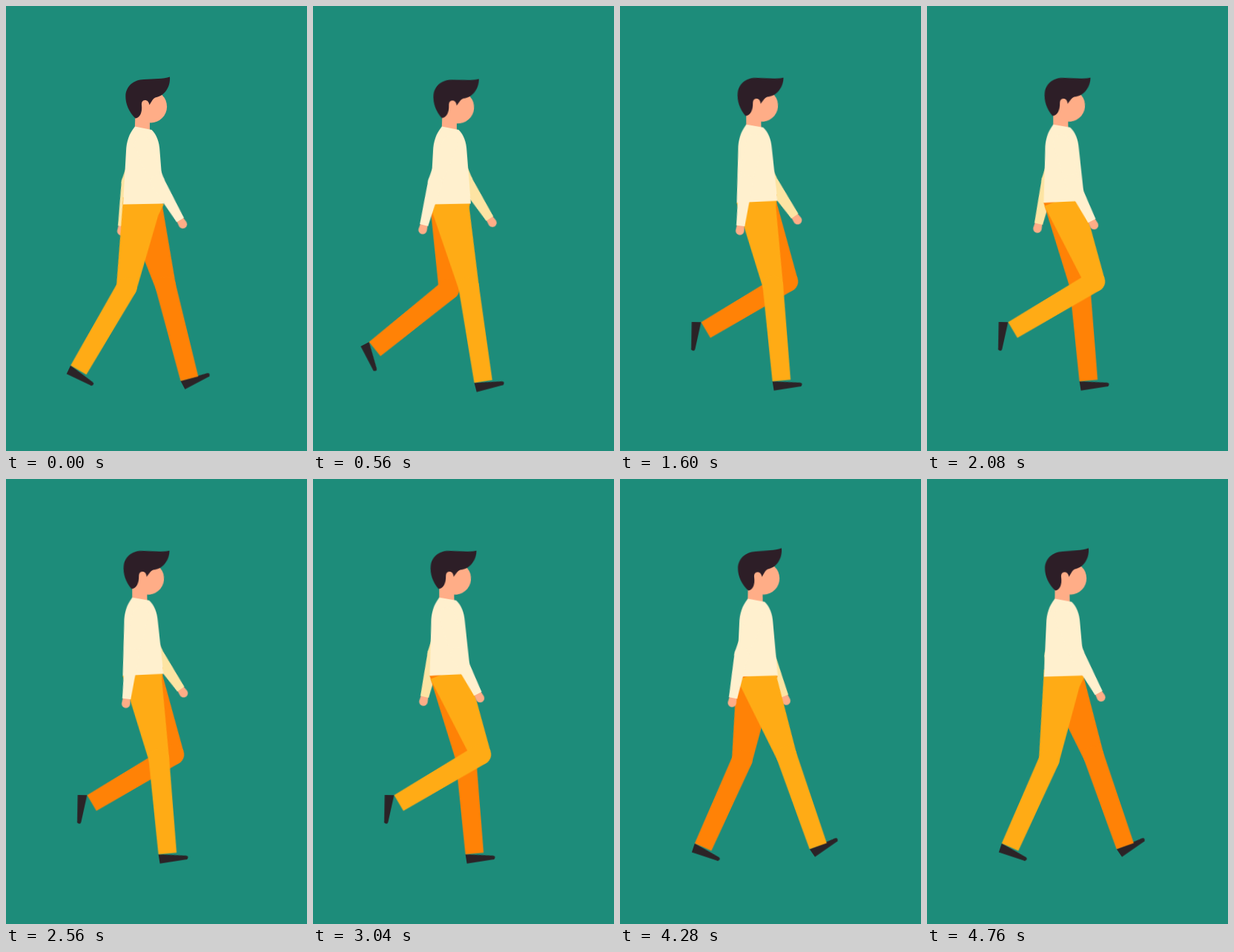
Animation of 406x600 px, one loop 4.8 s. Source, as an HTML page without scripts:

```html
<!DOCTYPE html>
<html lang="en">
<head>
<meta charset="utf-8">
<title>Walk cycle</title>
<style>
html, body { margin: 0; width: 100%; height: 100%; overflow: hidden; background: #1d8c7a; }
svg { display: block; width: 100%; height: 100%; }

.hair { fill: #2d1e27; }
.shoe { fill: #2b2327; }
.skin { fill: #ffad87; }
.shirt { fill: #fff0ce; }
.shade { fill: #fde4a3; }
.near { fill: #ffab15; --lag: 0s; }
.far { fill: #ff8206; --lag: -.48s; }

/* Sine swings: --a and --b are the extremes, --half the half period */
.sway, .bob { animation: sway var(--half) cubic-bezier(.364, 0, .636, 1) var(--lag) infinite alternate; }
.bob { --half: .24s; --lag: -.44s; animation-name: bob; }
.tilt { --half: .24s; --lag: -.44s; --a: .26deg; --b: -3.64deg; transform-origin: 185px 267px; }
.head { --half: .24s; --lag: -.296s; --a: 7.1deg; --b: -1deg; transform-origin: 180px 140px; }
.upper, .fore { --half: .48s; }
.front .upper { --lag: -.941s; --a: -22.4deg; --b: 22.8deg; }
.front .fore { --lag: -.72s; --a: -12.5deg; --b: -4.5deg; }
.rear .upper { --lag: -.88s; --a: 23.4deg; --b: -24deg; }
.rear .fore { --lag: -.16s; --a: -15.5deg; --b: -2deg; }
@keyframes sway { from { transform: rotate(var(--a)); } to { transform: rotate(var(--b)); } }
@keyframes bob { from { transform: translate(0, .4px); } to { transform: translate(-1px, -6.4px); } }

/* Legs: each angle is relative to the part above */
.thigh, .shin, .foot { animation: thigh .96s linear var(--lag) infinite; }
.shin { animation-name: shin; }
.foot { animation-name: foot; }
@keyframes thigh {
  0%, 100% { transform: rotate(11deg); }
  4.17% { transform: rotate(8.5deg); }
  8.33% { transform: rotate(1deg); }
  16.67% { transform: rotate(-20.5deg); }
  20.83% { transform: rotate(-29.5deg); }
  25% { transform: rotate(-36.2deg); }
  29.17% { transform: rotate(-40deg); }
  33.33% { transform: rotate(-40deg); }
  37.5% { transform: rotate(-36deg); }
  41.67% { transform: rotate(-28.5deg); }
  45.83% { transform: rotate(-20deg); }
  50% { transform: rotate(-15deg); }
  54.17% { transform: rotate(-13.2deg); }
  66.67% { transform: rotate(-10.7deg); }
  79.17% { transform: rotate(-1deg); }
  95.83% { transform: rotate(9.8deg); }
}
@keyframes shin {
  0%, 100% { transform: rotate(19deg); }
  4.17% { transform: rotate(32deg); }
  8.33% { transform: rotate(50deg); }
  12.5% { transform: rotate(67deg); }
  16.67% { transform: rotate(80deg); }
  20.83% { transform: rotate(82.5deg); }
  25% { transform: rotate(77deg); }
  29.17% { transform: rotate(64.5deg); }
  33.33% { transform: rotate(46.5deg); }
  37.5% { transform: rotate(27.5deg); }
  41.67% { transform: rotate(10.5deg); }
  45.83% { transform: rotate(.6deg); }
  50% { transform: rotate(.5deg); }
  58.33% { transform: rotate(3.6deg); }
  66.67% { transform: rotate(5.4deg); }
  79.17% { transform: rotate(10.2deg); }
  87.5% { transform: rotate(11.6deg); }
  95.83% { transform: rotate(14.2deg); }
}
@keyframes foot {
  0%, 100% { transform: rotate(-5deg); }
  4.17% { transform: rotate(1deg); }
  8.33% { transform: rotate(11deg); }
  16.67% { transform: rotate(31.5deg); }
  20.83% { transform: rotate(38.5deg); }
  25% { transform: rotate(40.5deg); }
  29.17% { transform: rotate(35.5deg); }
  33.33% { transform: rotate(25deg); }
  41.67% { transform: rotate(-7deg); }
  45.83% { transform: rotate(-15.6deg); }
  50% { transform: rotate(-13.5deg); }
  58.33% { transform: rotate(-6deg); }
  66.67% { transform: rotate(-3.7deg); }
  79.17% { transform: rotate(-1.2deg); }
  95.83% { transform: rotate(-6deg); }
}
</style>
</head>
<body>
<svg viewBox="0 0 406 600">
  <defs>
    <path id="thigh" d="M-27.5 -1L28 -2L23.5 14L13.8 118H-13.8Z"/>
    <path id="shin" d="M-13.8 0A13.8 13.8 0 0 1 13.8 0L12.3 128.5H-12.3Z"/>
    <path id="shoe" class="shoe" d="M0 0V12.8H35.5A2.7 2.7 0 0 0 36.5 7.4Z"/>
    <path id="upper" d="M-11 0A11 11 0 0 1 11 0L9.5 54A9.5 9.5 0 0 1 -9.5 54Z"/>
    <path id="fore" d="M-9.5 0A9.5 9.5 0 0 1 9.5 0L5.7 60H-5.7Z"/>
    <path id="hand" class="skin" d="M-5 59H5L5.7 66.8A5.7 5.7 0 0 1 -5.7 66.8Z"/>
  </defs>

  <g class="bob">
    <g class="sway tilt">
      <g class="rear shade" transform="translate(184 187)">
        <g class="sway upper">
          <use href="#upper"/>
          <g transform="translate(0 54)">
            <g class="sway fore"><use href="#hand"/><use href="#fore"/></g>
          </g>
        </g>
      </g>
    </g>

    <g class="far" transform="translate(185 264)">
      <g class="thigh">
        <use href="#thigh"/>
        <g transform="translate(0 118)">
          <g class="shin">
            <g transform="translate(-12.3 128.5)"><g class="foot"><use href="#shoe"/></g></g>
            <circle r="13.8"/>
            <use href="#shin"/>
          </g>
        </g>
      </g>
    </g>

    <g class="near" transform="translate(185 264)">
      <g class="thigh">
        <use href="#thigh"/>
        <g transform="translate(0 118)">
          <g class="shin">
            <g transform="translate(-12.3 128.5)"><g class="foot"><use href="#shoe"/></g></g>
            <circle r="13.8"/>
            <use href="#shin"/>
          </g>
        </g>
      </g>
    </g>

    <g class="sway tilt">
      <path class="skin" d="M174.500 144L194 148V174H173.500Z"/>
      <g class="sway head">
        <circle class="skin" cx="195.300" cy="135.700" r="21.800"/>
        <path class="hair" d="M221 95.500C222 110 213 121 203 123C198 124 196 130 193.500 133.500C192.500 129 190.500 127 187.500 127C184 127 182.500 130 183 134C184 143 181 151 174.500 151.500C166 143 161 132 161.300 121C162 108 172 99.500 186 99C200 98 212 98.500 221 95.500Z"/>
      </g>
      <path class="shirt" d="M174 162.500C166 172 162.500 183 162 196L158 267.500L213 266.500L207.500 196C207 183 203 173 196.500 167Z"/>
      <g class="front shirt" transform="translate(184 187)">
        <g class="sway upper">
          <use href="#upper"/>
          <g transform="translate(0 54)">
            <g class="sway fore"><use href="#hand"/><use href="#fore"/></g>
          </g>
        </g>
      </g>
    </g>
  </g>
</svg>
</body>
</html>
```
